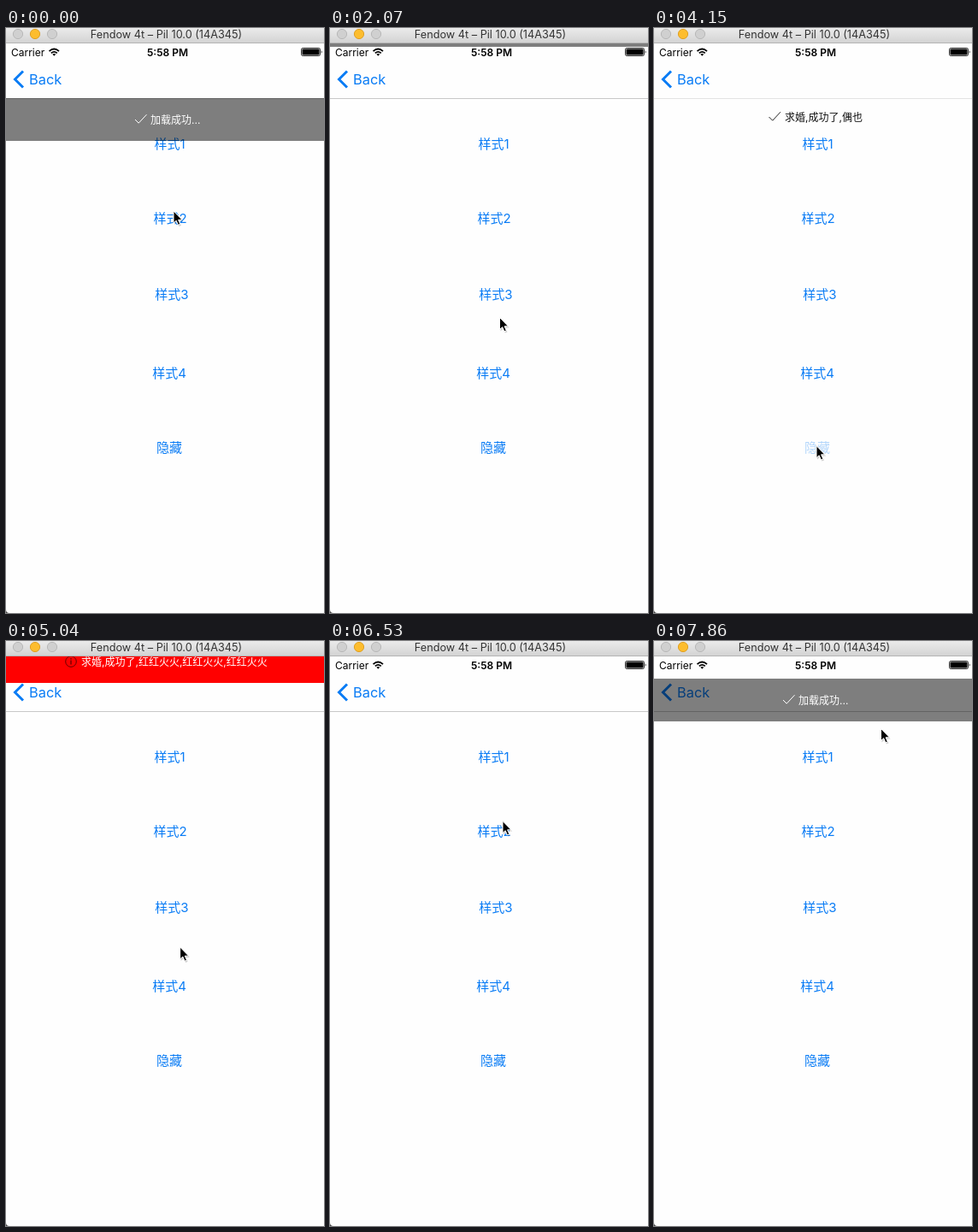
Recreate the animation shown at these times as an HTML page. Size 372 by 684 pixels, loop 8000 ms.

```html
<!DOCTYPE html>
<html lang="zh">
<head>
<meta charset="utf-8">
<style>
  html, body { margin: 0; width: 100%; height: 100%; overflow: hidden; background: #fefefe; }
  svg { display: block; width: 372px; height: 684px; font-family: Inter, "Noto Sans CJK SC", "Noto Sans CJK", sans-serif; }
  .link { fill: #0a7cf5; font-size: 15px; text-anchor: middle; }
  .banner text { font-size: 12px; }
  .line { fill: none; }
</style>
</head>
<body>
<svg viewBox="0 0 372 684">
  <defs>
    <linearGradient id="chrome" x2="0" y2="1">
      <stop stop-color="#ebebeb"/><stop offset="1" stop-color="#d2d2d2"/>
    </linearGradient>
  </defs>
  <rect width="372" height="684" fill="#fefefe"/>
  <path d="M0 680Q0 684 4 684H0Z" fill="#444"/>

  <!-- Status bar -->
  <text x="6" y="32.5" font-size="12">Carrier</text>
  <g class="line" stroke="#000" stroke-width="1.7">
    <path d="M50.5 27.2Q56.3 21.8 62 27.2M52.8 29.4Q56.3 26.2 59.8 29.4"/>
  </g>
  <path d="M54.3 30.6Q56.3 29.2 58.3 30.6L56.3 32.8Z"/>
  <text x="189" y="32.5" font-size="12" font-weight="600" text-anchor="middle">5:58 PM</text>
  <rect x="345.5" y="23.5" width="22" height="9" rx="1.8" fill="#fff" stroke="#000" stroke-width=".8"/>
  <rect x="346.5" y="24.5" width="20" height="7" rx="1"/>
  <path d="M368.8 26Q370.6 28 368.8 30Z"/>

  <!-- Navigation bar -->
  <path class="line" d="M20 50.5L10.5 60L20 69.5" stroke="#0a7cf5" stroke-width="3"/>
  <text x="27" y="66" font-size="16.4" fill="#0a7cf5">Back</text>
  <rect y="82" width="372" height="1" fill="#c8c8c8"/>

  <g id="links"></g>
  <g id="banners"></g>

  <!-- Window title bar -->
  <rect width="372" height="18" fill="url(#chrome)"/>
  <rect y="17" width="372" height="1" fill="#b4b4b4"/>
  <g fill="#d0d0d0" stroke="#b8b8b8">
    <circle cx="14" cy="7" r="5.6"/>
    <circle cx="34" cy="7" r="5.6" fill="#fdbd2e" stroke="#dfa023"/>
    <circle cx="54" cy="7" r="5.6"/>
  </g>
  <text x="187.5" y="12" font-size="12.7" fill="#333" text-anchor="middle">Fendow 4t – Pil 10.0 (14A345)</text>

  <g id="cursor">
    <path d="M1 1.5V16L4.3 13L6.4 18L9 17L6.8 12H11.2Z" fill="#000" opacity=".18"/>
    <path d="M0 0V14L3.2 11.2L5.4 16.3L7.8 15.3L5.6 10.3H10Z" stroke="#fff" stroke-width="1"/>
  </g>
</svg>
<script>
const LOOP = 8000, TICK = 147.4, STEP = 148.3, LAST_STEP = 53, SLIDE = 500;
const HIDDEN_Y = -32, TRAVEL = 114;

// Each press is a [start, end] pair.
const links = [
  { label: '样式1', x: 191.5, y: 140.5, presses: [[7300, 7480]] },
  { label: '样式2', x: 192, y: 227.5, presses: [[140, 300]] },
  { label: '样式3', x: 194, y: 316.5, presses: [[2370, 2520]] },
  { label: '样式4', x: 191, y: 408.5, presses: [[4700, 4850]] },
  { label: '隐藏', x: 191, y: 495.5, presses: [[1470, 1640], [4050, 4320]] },
];

const check = (x, y, color) =>
  `<path class="line" d="M${x} ${y}l4.2 4.2l9.3 -10" stroke="${color}"/>`;
const info = `<g class="line" stroke="#600"><circle cx="76" cy="25" r="6.3"/>
  <path d="M76 23.6V28.6M76 21V22.4" stroke-width="1.3"/></g>`;

// Moves alternate between sliding in and sliding out.
const banners = [
  { text: '加载成功...', x: 169, icon: check(151, 25, '#fff'), fill: '#000', alpha: .5,
    color: '#fff', height: 50, moves: [-1000, 300, 7553] },
  { text: '求婚,成功了', x: 167, icon: check(148.5, 25, '#fff'), fill: '#000', alpha: .5,
    color: '#fff', height: 50, moves: [300, 1630] },
  { text: '求婚,成功了,偶也', x: 153, icon: check(134.5, 22, '#222'), fill: '#fff', alpha: .5,
    color: '#111', height: 44, moves: [2530, 4370] },
  { text: '求婚,成功了,红红火火,红红火火,红红火火', x: 88, icon: info, fill: '#f00', alpha: 1,
    color: '#fff', height: 50, moves: [4870, 5757] },
];

// [time, x, y]
const cursorPath = [
  [0, 196, 214], [300, 196, 214], [1186, 199.5, 448.5], [1450, 192, 486], [1720, 192, 486],
  [2076, 198.5, 338.5], [2350, 195, 317], [3480, 195, 317], [4000, 190, 488.5], [4310, 190, 488.5],
  [4590, 190, 411], [4900, 190, 411], [5430, 267, 111.5], [5800, 267, 111.5], [6200, 130, 299],
  [6525, 202, 210.5], [6680, 195, 150], [7250, 193, 137], [7480, 193, 136], [7860, 265.5, 102.5],
];

const byId = id => document.getElementById(id);
byId('links').innerHTML = links.map(l =>
  `<text class="link" x="${l.x}" y="${l.y}">${l.label}</text>`).join('');
byId('banners').innerHTML = banners.map(b => `<g class="banner">
  <rect width="372" height="${b.height}" fill="${b.fill}" fill-opacity="${b.alpha}"/>${b.icon}
  <text x="${b.x}" y="${b.height / 2 + 4.5}" fill="${b.color}">${b.text}</text></g>`).join('');
const linkNodes = byId('links').children;
const bannerNodes = byId('banners').children;

const ease = p => {
  p = Math.min(1, Math.max(0, p));
  return p * p * (3 - 2 * p);
};
const moveTo = (node, x, y) => node.setAttribute('transform', `translate(${x} ${y})`);

function cursorAt(t) {
  const next = cursorPath.findIndex(k => k[0] > t);
  if (next < 0) return cursorPath.at(-1).slice(1);
  const [t0, x0, y0] = cursorPath[next - 1], [t1, x1, y1] = cursorPath[next];
  const p = ease((t - t0) / (t1 - t0));
  return [x0 + (x1 - x0) * p, y0 + (y1 - y0) * p];
}

function draw(t) {
  links.forEach((l, i) => {
    const pressed = l.presses.some(([from, to]) => t >= from && t < to);
    linkNodes[i].setAttribute('opacity', pressed ? .3 : 1);
  });
  banners.forEach((b, i) => {
    const shown = b.moves.reduce((sum, start, n) =>
      sum + (n % 2 ? -1 : 1) * ease((t - start) / SLIDE), 0);
    moveTo(bannerNodes[i], 0, Math.round(HIDDEN_Y + TRAVEL * shown));
  });
  moveTo(byId('cursor'), ...cursorAt(t));
}

function tick() {
  const step = Math.floor(performance.now() % LOOP / TICK);
  draw(Math.min(step, LAST_STEP) * STEP);
  requestAnimationFrame(tick);
}
tick();
</script>
</body>
</html>
```
